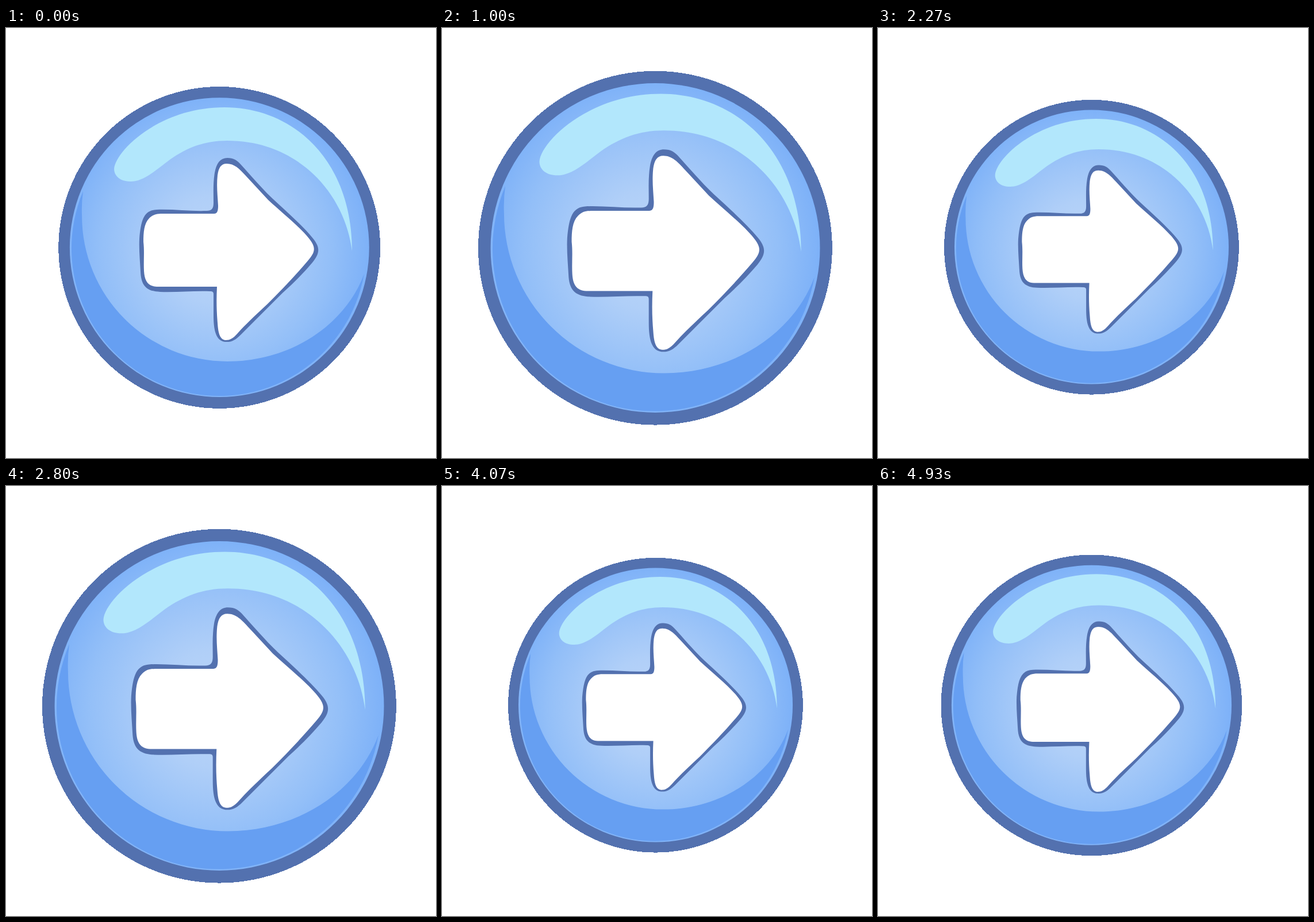
Recreate the animation shown at these times as an HTML page. Size 748 px wide and 748 px high, loop 4990 ms.

```html
<!DOCTYPE html>
<html lang="en">
<head>
<meta charset="utf-8">
<title>Pulsing arrow button</title>
<style>
  html, body { margin: 0; width: 100%; height: 100%; overflow: hidden; background: #fff; }
  svg { display: block; width: 100%; height: 100%; }
</style>
</head>
<body>
<svg viewBox="0 0 748 748">
  <defs>
    <radialGradient id="glow" gradientUnits="userSpaceOnUse" cx="365" cy="385" r="268">
      <stop offset="0" stop-color="#bdd6f8"/>
      <stop offset=".35" stop-color="#b0cff8"/>
      <stop offset=".75" stop-color="#93bff8"/>
      <stop offset="1" stop-color="#7db1f8"/>
    </radialGradient>
  </defs>
  <g id="button">
    <circle cx="371.2" cy="381.9" r="280" fill="#5371af" shape-rendering="crispEdges"/>
    <circle cx="371.3" cy="381.7" r="260.5" fill="url(#glow)"/>
    <!-- lower shade -->
    <path fill="#669ff2" d="M134 284Q131 305 132 327A253 253 0 0 0 385 580C495 580 590 517 623 428
      A256.5 256.5 0 1 1 134 284Z"/>
    <!-- upper shine -->
    <path fill="#b2e7fc" d="M188 245C190 214 266 138 380 138C500 138 602 230 602 388
      C590 290 510 196 385 196C345 196 315 208 285 229C262 246 240 267 217 267C198 267 188 257 188 245Z"/>
    <!-- arrow outline, then its face -->
    <path fill="#5371af" d="M385 226C396 226 402 230 409 238C428 259 446 280 464 297C488 319 517 345 534 366
      C547 382 546 392 533 408C516 428 500 444 481 461L408 534C399 543 392 547 381 546
      C362 544 361 517 361 498V463C361 459 359 458 355 458C325 457 298 460 268 459
      C243 458 235 447 234 424C233 405 231 385 232 366C235 333 240 317 262 316
      C292 315 320 319 349 318C358 318 361 314 361 304C361 288 360 270 363 252C366 235 373 226 385 226Z"/>
    <path fill="#fff" d="M384 236C398 236 407 246 418 258L456 299C481 322 511 346 527 366
      C540 382 538 390 525 405C503 431 478 457 455 480C438 496 419 513 403 531
      C395 540 390 543 382 543C371 542 369 528 368 513C366 490 366 470 367 450H262
      C246 449 241 439 240 423C239 405 241 390 239 372C239 356 240 340 249 331
      C257 323 264 323 275 323H362C368 323 369 317 369 309C368 290 366 275 368 256C370 243 374 236 384 236Z"/>
  </g>
</svg>
<script>
  const LOOP = 4990, BEAT = 13.5;          // ms, steps per pulse
  const PEAK = 2, LOW = 10;                // steps within a pulse
  const SMALL = 235.5, SWING = 82.5, BASE = 280;
  const button = document.getElementById('button');

  // Radius accelerates up to the peak, then eases down to the low point.
  function radius(step) {
    const x = step % BEAT;
    const falling = x > PEAK && x <= LOW;
    const part = falling
      ? (LOW - x) / (LOW - PEAK - 0.5)
      : ((x - LOW + BEAT) % BEAT) / (PEAK - LOW + BEAT);
    return SMALL + SWING * Math.pow(part, falling ? 1.5 : 1.37);
  }

  function draw(now) {
    // 15 steps a second, each starting on a hundredth of a second
    const step = Math.floor((Math.floor(now % LOOP / 10) + 0.34) * 0.15);
    const scale = radius(step) / BASE;
    button.setAttribute('transform', `translate(374 374) scale(${scale}) translate(-374 -374)`);
    requestAnimationFrame(draw);
  }

  draw(0);
</script>
</body>
</html>
```
